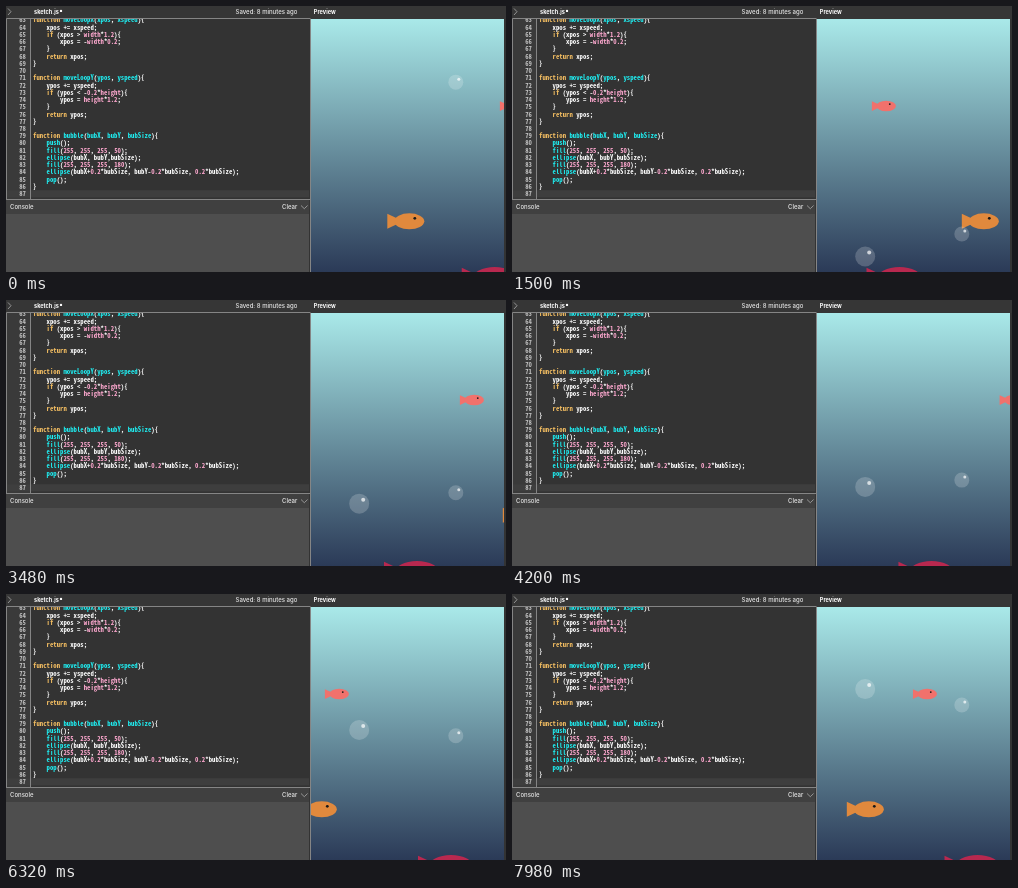
Write an HTML page that moves like this. It is 500 px wide and 266 px high and loops after 8000 ms.

```html
<!DOCTYPE html>
<html lang="en">
<head>
<meta charset="utf-8">
<title>Fish tank sketch</title>
<style>
  html, body { margin: 0; width: 100%; height: 100%; overflow: hidden; background: #333; }
  svg { display: block; width: 100vw; height: 100vh; }
  .ui { font: 500 6px Inter, "Open Sans", sans-serif; fill: #e8e8e8; }
  .bold { font-weight: 700; font-size: 5.6px; fill: #fff; }
  .code text { white-space: pre; fill: #fdfdfd; }
  .code .num { fill: #c1c1c1; text-anchor: end; }
  .key { fill: #f7c063; }
  .call { fill: #1feef2; }
  .lit { fill: #ffa9d0; }
  .line { fill: none; stroke: #aaa; stroke-width: .8; }
  .edge { fill: none; stroke: #858585; }
</style>
</head>
<body>
<svg viewBox="0 0 500 266" preserveAspectRatio="none">
  <defs>
    <linearGradient id="water" x1="0" y1="0" x2="0" y2="1">
      <stop offset="0" stop-color="#a9e9e9"/>
      <stop offset="1" stop-color="#2b3a57"/>
    </linearGradient>
    <clipPath id="tank"><rect x="305" y="13" width="193" height="253"/></clipPath>
    <clipPath id="editor"><rect x="1" y="13" width="302" height="181"/></clipPath>
  </defs>

  <rect width="500" height="266" fill="#333"/>
  <g class="code" id="code" clip-path="url(#editor)">
    <rect x="1" y="13" width="23" height="181" fill="#3a3a3a"/>
    <rect x="1" y="184.2" width="302" height="7.2" fill="#3e3e3e"/>
  </g>

  <rect width="500" height="13" fill="#363636"/>
  <path class="line" d="M2 2.5 5 5.7 2 9"/>
  <text class="ui bold" x="28" y="8.4">sketch.js</text>
  <circle cx="55" cy="4.9" r="1.2" fill="#fff"/>
  <text class="ui" x="229.6" y="8.4">Saved: 8 minutes ago</text>
  <text class="ui bold" x="307.8" y="8.4">Preview</text>

  <rect y="194" width="303" height="14" fill="#404040"/>
  <rect y="208" width="303" height="58" fill="#4e4e4e"/>
  <text class="ui" x="4" y="203.4">Console</text>
  <text class="ui" x="276" y="203.4">Clear</text>
  <path class="line" d="M295 199.5 298.3 202.7 301.6 199.5"/>
  <path class="edge" d="M.5 193.5V12.5H304.5M24.5 13V193M0 193.5H304M304.5 13V266"/>

  <g clip-path="url(#tank)">
    <rect x="305" y="13" width="193" height="253" fill="url(#water)"/>
    <g id="life"></g>
  </g>
</svg>
<script>
const FIRST_LINE = 63;
const source = `function moveLoopX(xpos, xspeed){
    xpos += xspeed;
    if (xpos > width*1.2){
        xpos = -width*0.2;
    }
    return xpos;
}

function moveLoopY(ypos, yspeed){
    ypos += yspeed;
    if (ypos < -0.2*height){
        ypos = height*1.2;
    }
    return ypos;
}

function bubble(bubX, bubY, bubSize){
    push();
    fill(255, 255, 255, 50);
    ellipse(bubX, bubY,bubSize);
    fill(255, 255, 255, 180);
    ellipse(bubX+0.2*bubSize, bubY-0.2*bubSize, 0.2*bubSize);
    pop();
}
`;

const span = (kind, text) => `<tspan class="${kind}">${text}</tspan>`;
const token = /\b(function|if|return)\b|\b(push|fill|ellipse|pop)\b|\b(width|height|\d+(?:\.\d+)?)\b/g;

function highlight(line) {
  if (line.startsWith('function'))
    return line.replace(/\w+/g, word => span(word === 'function' ? 'key' : 'call', word));
  return line.replace(/</g, '&lt;').replace(token, (word, key, call) =>
    span(key ? 'key' : call ? 'call' : 'lit', word));
}

// Choose the font size that gives the wanted character advance.
const ADVANCE = 3.38;
const family = '"Noto Sans Mono CJK JP", "Noto Sans Mono CJK SC", "DejaVu Sans Mono", monospace';
const pen = document.createElement('canvas').getContext('2d');
pen.font = `700 100px ${family}`;
const fontSize = ADVANCE * 100 / pen.measureText('0').width;

const code = document.getElementById('code');
code.style.font = `700 ${fontSize}px ${family}`;
code.innerHTML += source.split('\n').map((line, i) => {
  const y = 16.4 + i * 7.24;
  return `<text class="num" x="20" y="${y}">${FIRST_LINE + i}</text>` +
    `<text x="27" y="${y}">${highlight(line)}</text>`;
}).join('');

// Positions are given at travel 0; speed is pixels per unit of travel.
const fishes = [
  { x: 374.2, y: 100, speed: 1, size: .65, color: '#f1716c' },
  { x: 471.8, y: 215.3, speed: .5, size: 1, color: '#e0893d' },
  { x: 387.5, y: 273, speed: .25, size: 1.5, color: '#b8284f' }
];
const bubbles = [
  { x: 353.2, y: 250.5, speed: .498, r: 10 },
  { x: 449.8, y: 228, speed: .375, r: 7.5 }
];

const fishShape = ({ size, color }) => `<g><g transform="scale(${size})" fill="${color}">
  <path d="M-22-7.5-6 0-22 7.5Z"/><ellipse rx="15" ry="8"/>
  <circle cx="5.5" cy="-3" r="1.4" fill="#181818"/></g></g>`;
const bubbleShape = ({ r }) => `<g fill="#fff"><circle r="${r}" fill-opacity=".196"/>
  <circle cx="${r * .4}" cy="${-r * .4}" r="${r * .2}" fill-opacity=".706"/></g>`;

const life = document.getElementById('life');
life.innerHTML = fishes.map(fishShape).join('') + bubbles.map(bubbleShape).join('');
const nodes = [...life.children];

// [time in ms, travel]; the sketch restarts at 500.
const steps = [
  [0, 405], [500, 429.5], [500, -33], [820, -33], [1500, 0], [2600, 53],
  [3480, 94], [5080, 169], [6320, 230], [8000, 313]
];
const LOOP = 8000, RESTART = 500;
const LEFT = 266, SPAN = 271;

function travelAt(time) {
  const next = steps.findIndex(([t]) => t > time);
  const [t0, a] = steps[next - 1], [t1, b] = steps[next];
  return a + (b - a) * (time - t0) / (t1 - t0);
}

function place(node, x, y) {
  node.setAttribute('transform', `translate(${x.toFixed(2)} ${y.toFixed(2)})`);
}

function draw(now) {
  const time = Math.floor(now % LOOP / 20) * 20;
  const travel = travelAt(time);
  fishes.forEach((f, i) =>
    place(nodes[i], LEFT + (f.x + f.speed * travel - LEFT) % SPAN, f.y));
  bubbles.forEach((b, i) =>
    place(nodes[fishes.length + i], b.x, b.y - b.speed * travel));
  nodes[fishes.length].style.display = time < RESTART ? 'none' : '';
}

const start = performance.now();
function tick() {
  draw(performance.now() - start);
  requestAnimationFrame(tick);
}
tick();
</script>
</body>
</html>
```
